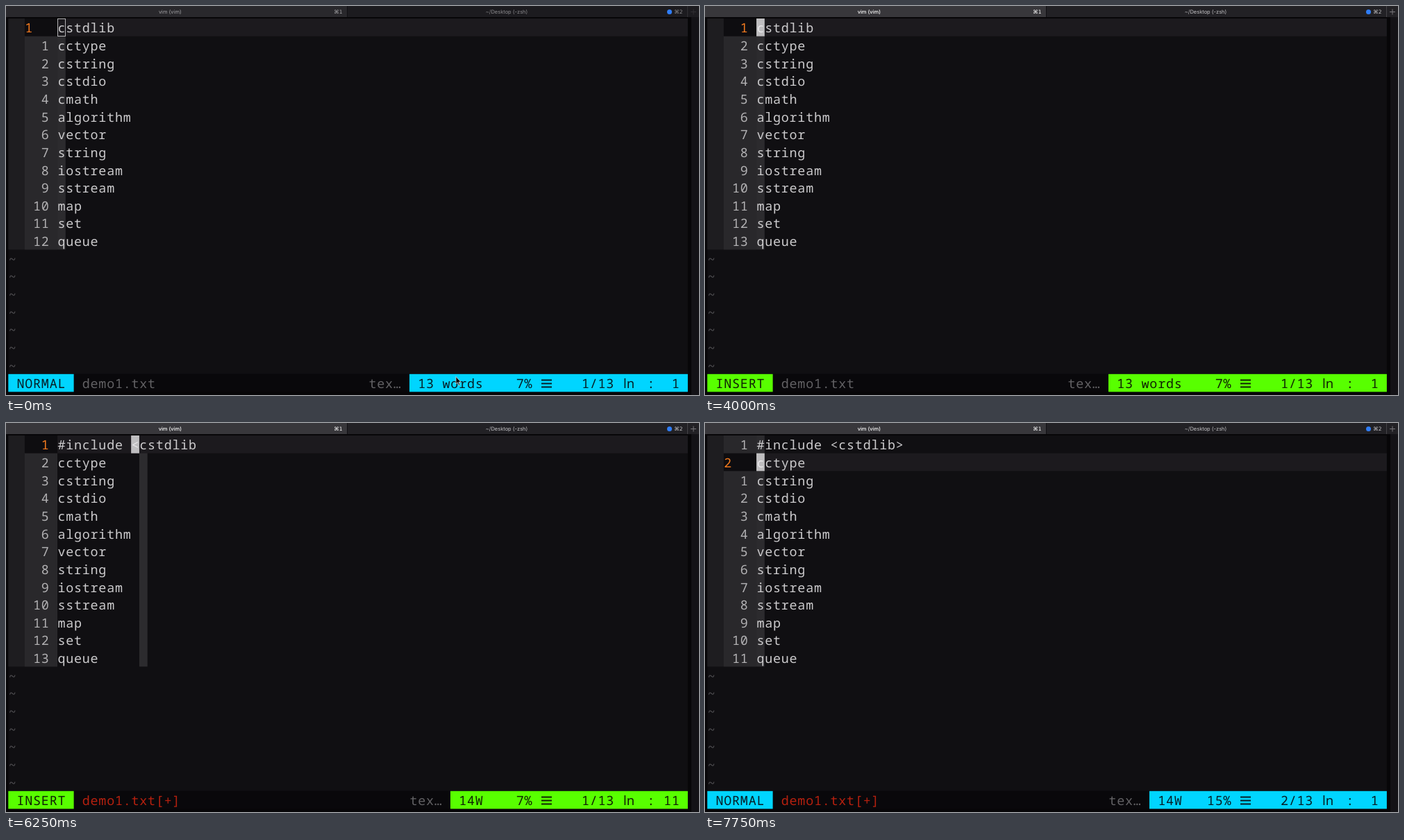
Recreate the animation shown at these times as an HTML page with a canvas. Size 998 px wide and 561 px high, loop 8000 ms.

```html
<!DOCTYPE html>
<html lang="en">
<head>
<meta charset="utf-8">
<title>Terminal editing session</title>
<style>
html, body { margin: 0; width: 100%; height: 100%; overflow: hidden; background: #070608; }
canvas { display: block; width: 100%; height: 100%; }
</style>
</head>
<body>
<canvas id="stage"></canvas>
<script>
const W = 998, H = 561, LOOP = 8000;
const X0 = 3.3, Y0 = 18, CW = 11.79, RH = 25.64, COLS = 83;
const GUTTER = 6, STATUS_ROW = 20, BASELINE = 20.4;
const MONO = '18.4px "Noto Sans Mono", "DejaVu Sans Mono", monospace';
const UI = 'Inter, "DejaVu Sans", sans-serif';
const WORDS = ['cstdlib', 'cctype', 'cstring', 'cstdio', 'cmath', 'algorithm',
  'vector', 'string', 'iostream', 'sstream', 'map', 'set', 'queue'];
const PREFIX = '#include <';
const CLOSE_AT = 7250;

// Editor states: start time, mode, line, column, and block cursor column if it differs.
const STATES = [
  { at: 0, mode: 'NORMAL', line: 1, col: 1 },
  { at: 3000, mode: 'INSERT', line: 1, col: 1 },
  { at: 4250, mode: 'INSERT', line: 1, col: 2 },
  { at: 5000, mode: 'INSERT', line: 1, col: 4 },
  { at: 5250, mode: 'INSERT', line: 1, col: 6 },
  { at: 5500, mode: 'INSERT', line: 1, col: 8 },
  { at: 5750, mode: 'INSERT', line: 1, col: 10 },
  { at: 6250, mode: 'INSERT', line: 1, col: 11, block: 10 },
  { at: 6500, mode: 'NORMAL', line: 1, col: 10 },
  { at: 6750, mode: 'INSERT', line: 1, col: 18 },
  { at: 7250, mode: 'INSERT', line: 1, col: 19 },
  { at: 7500, mode: 'NORMAL', line: 2, col: 6 },
  { at: 7750, mode: 'NORMAL', line: 2, col: 1 }
];
const POINTER = [
  { at: 0, x: 647.5, y: 534 },
  { at: 250, x: 628, y: 436 },
  { at: 750, x: 626, y: 432 },
  { at: 2250 }
];

const canvas = document.getElementById('stage');
const ctx = canvas.getContext('2d');
const dpr = window.devicePixelRatio || 1;
canvas.width = Math.round(W * dpr);
canvas.height = Math.round(H * dpr);
ctx.textRendering = 'geometricPrecision';

const latest = (list, t) => list.filter(s => s.at <= t).pop();
const cellX = c => X0 + c * CW;
const rowY = r => Y0 + r * RH;

function rect(x, y, w, h, color) {
  ctx.fillStyle = color;
  ctx.fillRect(x, y, w, h);
}

function cells(col, row, cols, rows, color) {
  rect(cellX(col), rowY(row), cols * CW, rows * RH, color);
}

function put(text, col, row, color) {
  ctx.font = MONO;
  ctx.textAlign = 'center';
  ctx.textBaseline = 'alphabetic';
  ctx.fillStyle = color;
  [...text].forEach((ch, i) => ctx.fillText(ch, cellX(col + i + 0.5), rowY(row) + BASELINE));
}

function label(text, x, color, weight = 400, font = UI) {
  ctx.font = `${weight} 7.5px ${font}`;
  ctx.textAlign = 'center';
  ctx.textBaseline = 'alphabetic';
  ctx.fillStyle = color;
  ctx.fillText(text, x, 11.1);
}

function drawTabs(focused) {
  const front = focused ? '#ffffff' : '#a3a2a5';
  const back = focused ? '#c3c2c5' : '#8b8a8d';
  const weight = focused ? 500 : 400;
  rect(0, 0, W, 16, focused ? '#222125' : '#1c1b1f');
  rect(0, 0, 491, 16, focused ? '#38373b' : '#29282c');
  rect(491, 0, 1, 16, '#111014');
  rect(981, 0, 1, 16, focused ? '#444347' : '#302f33');
  label('vim (vim)', 236.3, front, weight);
  label('⌘1', 478.5, front, weight, '"DejaVu Sans", sans-serif');
  label('~/Desktop (-zsh)', 721, back);
  label('⌘2', 968.5, back, 400, '"DejaVu Sans", sans-serif');
  ctx.fillStyle = '#2f7df6';
  ctx.beginPath();
  ctx.arc(955.5, 8.5, 3.5, 0, Math.PI * 2);
  ctx.fill();
  const plus = focused ? '#78777b' : '#302f33';
  rect(986, 8, 8, 1, plus);
  rect(989.5, 4.5, 1, 8, plus);
}

function drawBuffer(s, lines, focused) {
  const cur = s.line - 1, insert = s.mode === 'INSERT', n = lines.length;
  cells(0, 0, GUTTER, n, '#1e1d20');
  cells(2, 0, 4, n, '#29282b');
  cells(GUTTER + s.col - 1, 0, 1, n, '#2c2b2e');
  cells(2, cur, 4, 1, '#0e0d10');
  cells(GUTTER, cur, COLS - GUTTER, 1, '#1c1a1e');

  lines.forEach((text, i) => {
    const here = i === cur;
    const num = String(insert || here ? i + 1 : Math.abs(i - cur));
    put(here && !insert ? num : num.padStart(3), 2, i, here ? '#f0791e' : '#b2b1b3');
    put(text, GUTTER, i, '#cccbcd');
  });
  for (let r = n; r < STATUS_ROW; r++) put('~', 0, r, '#525154');

  const at = (s.block || s.col) - 1, col = GUTTER + at;
  if (focused) {
    cells(col, cur, 1, 1, '#bfbec0');
    put(lines[cur][at] || ' ', col, cur, '#e9e8ea');
  } else {
    ctx.strokeStyle = '#b4b3b5';
    ctx.lineWidth = 1;
    ctx.strokeRect(74.5, 18.5, 11, 25);
  }
}

function drawStatus(s, t) {
  const insert = s.mode === 'INSERT';
  const accent = insert ? '#58ff00' : '#00d5ff';
  const ink = insert ? '#102204' : '#061e26';
  const changed = t >= 4250, short = t >= 5750;
  const left = short ? 54 : 49;
  cells(0, STATUS_ROW, COLS, 1, '#09080b');
  cells(0, STATUS_ROW, 8, 1, accent);
  cells(left, STATUS_ROW, COLS - left, 1, accent);
  put(s.mode, 1, STATUS_ROW, ink);
  put(changed ? 'demo1.txt[+]' : 'demo1.txt', 9, STATUS_ROW, changed ? '#b5200f' : '#626164');
  put('tex…', left - 5, STATUS_ROW, '#626164');
  put(short ? '14W' : '13 words', left + 1, STATUS_ROW, ink);
  put((Math.floor(s.line * 100 / 13) + '%').padStart(3), 61, STATUS_ROW, ink);
  put(s.line + '/13', 70, STATUS_ROW, ink);
  put(':', 78, STATUS_ROW, ink);
  put(String(s.col).padStart(2), 80, STATUS_ROW, ink);
  for (const y of [538.5, 543.5, 548.5]) rect(771, y, 15, 2, ink);
  ctx.font = '500 18.5px "Noto Sans", sans-serif';
  ctx.textAlign = 'left';
  ctx.fillText('ln', 889, rowY(STATUS_ROW) + BASELINE);
}

function drawPointer({ x, y }) {
  if (x === undefined) return;
  ctx.save();
  ctx.translate(x, y);
  ctx.beginPath();
  ctx.moveTo(0.5, 0.5);
  ctx.lineTo(0.5, 11);
  ctx.lineTo(2.8, 8.9);
  ctx.lineTo(4.6, 13);
  ctx.lineTo(6.2, 12.3);
  ctx.lineTo(4.5, 8.3);
  ctx.lineTo(7.5, 8.2);
  ctx.closePath();
  ctx.fillStyle = '#050505';
  ctx.fill();
  ctx.strokeStyle = '#d8d8d8';
  ctx.lineWidth = 0.8;
  ctx.stroke();
  ctx.restore();
}

function draw(t) {
  const s = latest(STATES, t), focused = t >= 750;
  const typed = Math.max(...STATES.filter(v => v.at <= t).map(v => v.col)) - 1;
  const lines = [...WORDS];
  lines[0] = PREFIX.slice(0, typed) + lines[0] + (t >= CLOSE_AT ? '>' : '');

  ctx.setTransform(canvas.width / W, 0, 0, canvas.height / H, 0, 0);
  rect(0, 0, W, H, '#070608');
  rect(987, 16, 11, H - 16, '#131216');
  cells(0, 0, COLS, STATUS_ROW, '#100f12');
  drawTabs(focused);
  drawBuffer(s, lines, focused);
  drawStatus(s, t);
  drawPointer(latest(POINTER, t));
}

const start = performance.now();
function tick() {
  draw((performance.now() - start) % LOOP);
  requestAnimationFrame(tick);
}
tick();
</script>
</body>
</html>
```
